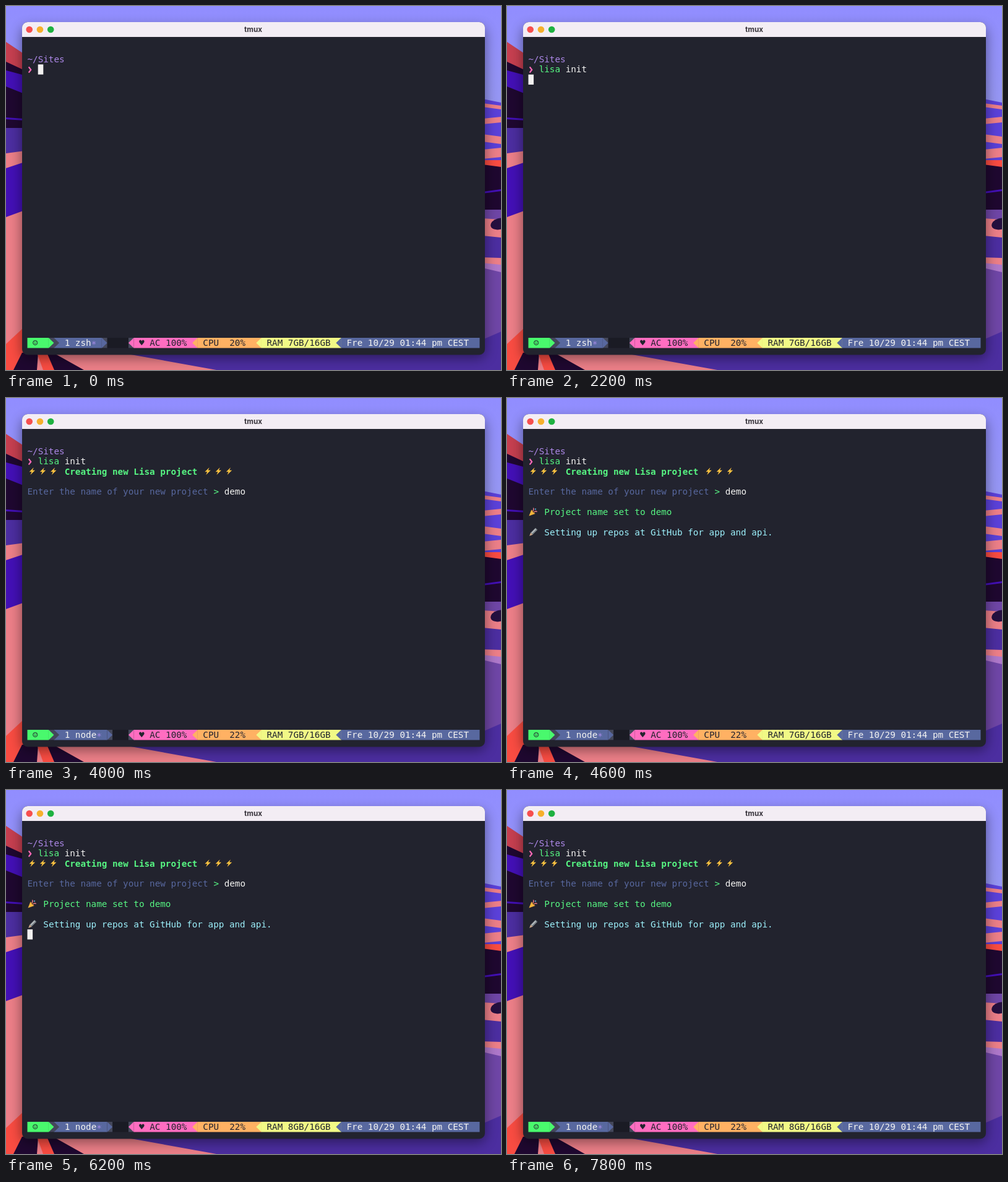
An HTML page for the animation above (8 s loop, 800 px wide and 588 px high).

```html
<!DOCTYPE html>
<html lang="en">
<head>
<meta charset="utf-8">
<title>Terminal</title>
<style>
  html, body { margin: 0; width: 100%; height: 100%; overflow: hidden; background: #8f8cff; }
  svg { display: block; width: 100vw; height: 100vh; }
  text { font: 14.28px "DejaVu Sans Mono", monospace; white-space: pre; }
  .title { font: 700 11.7px Inter, sans-serif; }
  .bold { font-weight: 700; }
  .path { text-decoration: underline 1px; text-underline-offset: 1px; }
</style>
</head>
<body>
<svg viewBox="0 0 800 588" preserveAspectRatio="none">
  <defs>
    <linearGradient id="sky" x2="0" y2="1">
      <stop stop-color="#918dff"/><stop offset="1" stop-color="#9697f2"/>
    </linearGradient>
    <filter id="blur" x="-10%" y="-10%" width="120%" height="120%">
      <feGaussianBlur stdDeviation="10"/>
    </filter>
    <path id="bolt" d="M2.6-6-4.6 1H-.8L-2.8 6 4.8-1.6H.7Z" fill="#ffc440"/>
  </defs>
  <rect width="800" height="160" fill="url(#sky)"/>
  <g id="wall"></g>
  <rect x="25" y="34" width="750" height="535" rx="10" opacity=".42" filter="url(#blur)"/>
  <rect x="26" y="26" width="748" height="537.5" rx="9" fill="#22232e"/>
  <path d="M26 50V35a9 9 0 0 1 9-9H765a9 9 0 0 1 9 9V50Z" fill="#f3edf4"/>
  <g id="buttons"></g>
  <text class="title" x="399.5" y="41.5" text-anchor="middle" fill="#37333b">tmux</text>
  <g id="screen"></g>
  <g id="status"></g>
</svg>
<script>
const LOOP = 8000, STEP = 200, CELL = 8.6, LEFT = 34.5, ROW = 16.35, BASE = 91;
const WHITE = '#f4f4f2', GREEN = '#57f783', CYAN = '#9cf0fb', BLUE = '#58689f', DARK = '#22232e', GRAY = '#44475a';
const SALMON = '#ec7f88', RED = '#f94c42', NIGHT = '#1f0830', VIOLET = '#4310b6', PURPLE = '#4c2ea0', IRIS = '#5b41d9', MAUVE = '#6f46a6';

const $ = id => document.getElementById(id);
const col = c => LEFT + c * CELL;
const line = r => BASE + r * ROW;
const poly = (fill, points) => `<polygon fill="${fill}" points="${points}"/>`;
const text = (c, y, str, fill, cls = '') =>
  `<text x="${col(c)}" y="${y}" fill="${fill}" class="${cls}">${str.replace(/>/g, '&gt;')}</text>`;

// Wallpaper: each layer covers a side strip from its tilted top edge down
const layer = x => ([fill, top, tilt, depth = 588]) =>
  poly(fill, [x, top, x + 30, top + tilt, x + 30, top + tilt + depth, x, top + depth]);
const slat = (fill, top, bottom, width, spread = width) =>
  poly(fill, [top, 560, top + width, 560, bottom + spread, 588, bottom, 588]);

function drawWall() {
  const west = [
    ['#c63f50', 58, 20], [NIGHT, 90, 14], [VIOLET, 104, 8], [NIGHT, 130, 12],
    [VIOLET, 180, 2, 3], [PURPLE, 197, 0], [SALMON, 238, -4], [VIOLET, 262, -10],
    [SALMON, 341, -11], [RED, 546, -28],
  ];
  const slivers = [0, 1, 2, 3].map(i => [SALMON, 157 + 25 * i, i % 2 ? -3 : 4, 6 + 3 * i]);
  const east = [
    [IRIS, 150, 6], ...slivers, [RED, 249, 0], [NIGHT, 256, 4], [VIOLET, 300, -4, 3],
    [MAUVE, 329, 0], [SALMON, 343, 2], [PURPLE, 371, 3], [SALMON, 406, 1],
    ['#ae78ca', 415, 3], [MAUVE, 423, 7], [PURPLE, 539, -13],
  ];
  return west.map(layer(0)).join('') + east.map(layer(770)).join('') +
    '<ellipse cx="797" cy="352" rx="14" ry="9" fill="#25103f" transform="rotate(-14 797 352)"/>' +
    slat(SALMON, 30, 30, 160, 320) + slat(PURPLE, 185, 340, 615, 460) +
    slat(NIGHT, 26, 12, 26, 38) + slat(RED, 50, 60, 18) + slat(NIGHT, 66, 78, 10, 48);
}

const buttons = ['#f64f4f', '#f6b02c', '#1fb141']
  .map((fill, i) => `<circle cx="${37.7 + 17.25 * i}" cy="38" r="5.3" fill="${fill}"/>`).join('');

const bolts = c => [1, 3, 5].map(i => `<use href="#bolt" x="${col(c + i) - .9}" y="118.3"/>`).join('');

const popper = `<g transform="translate(42 184)">
  <path d="M-6.5 6.5-2.5-3.5 3.5 3Z" fill="#f3b53c"/><path d="M-2.5-3.5Q2-2 3.5 3 0 1.5-2.5-3.5" fill="#8c5b35"/>
  <path d="M0-2Q2-4 .5-6.5M2 0Q5-2 6.5 0" fill="none" stroke="#e8798c" stroke-width="1.4"/>
  <circle cx="4" cy="-4.5" r="1.1" fill="#62bff0"/></g>`;

const tool = `<g transform="translate(42 217) rotate(-45)">
  <path d="M-8 0-3-2.2H8V2.2H-3Z" fill="#7d858b"/><path d="M-2-1.4H7V0H-2Z" fill="#c5cbce"/>
  <path d="M-8 0-3-2.2V2.2Z" fill="#c7a184"/></g>`;

const cursor = (c, r) =>
  `<rect x="${col(c)}" y="${line(r) - 13}" width="${CELL}" height="16.3" fill="#f2f0f0"/>`;

// Part of a string typed so far, one character per step
const typed = (str, t, start) => str.slice(0, Math.max(0, Math.floor((t - start) / STEP) + 1));

function drawScreen(t) {
  const command = typed('lisa init', t, 200), name = typed('demo', t, 3200);
  const word = command.slice(0, 4), arg = command.slice(5);
  let at = [2 + command.length, 1];
  let out = text(0, line(0), '~/Sites', '#ad88e8') +
    '<path d="M36.7 98.4 40.2 103 36.7 107.6" fill="none" stroke="#ff69b8" stroke-width="2.2"/>' +
    text(2, line(1), word, word === 'lisa' ? GREEN : '#ff5c57') +
    text(7, line(1), arg, WHITE, arg === 'i' ? 'path' : '');
  if (t >= 2000) at = [0, 2];
  if (t >= 2400) {
    at = [37 + name.length, 4];
    out += bolts(0) + text(7, line(2), 'Creating new Lisa project', GREEN, 'bold') + bolts(33) +
      text(0, line(4), 'Enter the name of your new project', BLUE) +
      text(35, line(4), '>', GREEN) + text(37, line(4), name, WHITE);
  }
  if (t >= 4400) {
    at = [0, 9];
    out += popper + text(3, line(6), 'Project name set to demo', GREEN) +
      tool + text(3, line(8), 'Setting up repos at GitHub for app and api.', CYAN);
  }
  const blinkOn = (t + 900) % 1000 < 500;
  return out + (t < 2400 || blinkOn ? cursor(...at) : '');
}

// Status line: bands and arrow heads on the character grid
const TOP = 536, MID = 544.2, BOTTOM = 552.4;
const band = (a, b, fill) => poly(fill, [col(a), TOP, col(b), TOP, col(b), BOTTOM, col(a), BOTTOM]);
const arrow = (base, tip, fill) => poly(fill, [col(base), TOP, col(tip), MID, col(base), BOTTOM]);

function drawStatus(t) {
  const job = t < 2600 ? 'zsh' : 'node';
  const end = 11 + job.length;
  const y = 549.2;
  const segment = (a, b, fill, str, ink = DARK) =>
    arrow(a + 1, a, fill) + band(a + 1, b, fill) + text(a + 2, y, str, ink);
  return band(0, 85, '#1a1b24') +
    band(4, 5, GRAY) + band(0, 4, '#49f96d') + arrow(4, 5, '#49f96d') + text(1, y, '☺', DARK) +
    band(5, end, BLUE) + arrow(5, 6, GRAY) + band(end, end + 1, GRAY) + arrow(end, end + 1, BLUE) +
    text(7, y, '1 ' + job, WHITE) + text(9 + job.length, y + 2, '*', '#a58be6') +
    band(19, 20, GRAY) + segment(19, 32, '#ff6dc0', '♥ AC 100%') +
    segment(31, 44, '#ffb163', `CPU  ${t < 3400 ? 20 : 22}%`) +
    segment(43, 59, '#f1f986', `RAM ${t < 4800 ? 7 : 8}GB/16GB`) +
    segment(58, 85, BLUE, 'Fre 10/29 01:44 pm CEST', WHITE);
}

let shown = -1;
function update(ms) {
  const t = Math.floor(ms % LOOP / STEP) * STEP;
  if (t === shown) return;
  shown = t;
  $('screen').innerHTML = drawScreen(t);
  $('status').innerHTML = drawStatus(t);
}

$('wall').innerHTML = drawWall();
$('buttons').innerHTML = buttons;
const start = performance.now();
function tick() {
  update(performance.now() - start);
  requestAnimationFrame(tick);
}
tick();
</script>
</body>
</html>
```
